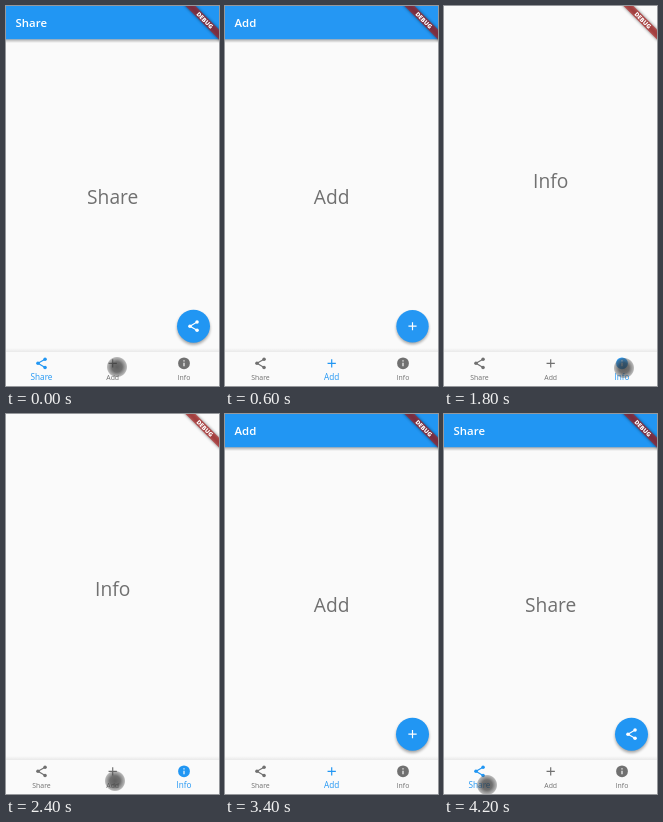
An HTML page that plays this animation: 213x380 px, repeating every 4.4 s.

```html
<!DOCTYPE html>
<html lang="en">
<head>
<meta charset="utf-8">
<title>Bottom navigation</title>
<style>
html, body { margin: 0; width: 100%; height: 100%; overflow: hidden; background: #fafafa; }
svg { display: block; width: 100%; height: 100%; }
text { font-family: "Open Sans", "Noto Sans", sans-serif; }
.mid { text-anchor: middle; }
</style>
</head>
<body>
<svg id="stage" viewBox="0 0 213 380">
  <defs>
    <linearGradient id="under" x2="0" y2="1">
      <stop offset="0" stop-opacity=".32"/><stop offset="1" stop-opacity="0"/>
    </linearGradient>
    <linearGradient id="over" x2="0" y2="1">
      <stop offset="0" stop-opacity="0"/><stop offset="1" stop-opacity=".07"/>
    </linearGradient>
    <radialGradient id="press">
      <stop offset="0" stop-color="#333" stop-opacity=".78"/>
      <stop offset=".5" stop-color="#3a3a3a" stop-opacity=".72"/>
      <stop offset=".72" stop-color="#484848" stop-opacity=".55"/>
      <stop offset=".9" stop-color="#555" stop-opacity=".42"/>
      <stop offset="1" stop-color="#666" stop-opacity="0"/>
    </radialGradient>
    <filter id="soft" x="-50%" y="-50%" width="200%" height="200%"><feGaussianBlur stdDeviation="1.7"/></filter>
    <g id="icon-share">
      <path d="M18 5 6 12 18 19" fill="none" stroke="currentColor" stroke-width="2"/>
      <circle cx="18" cy="5" r="3"/><circle cx="6" cy="12" r="3"/><circle cx="18" cy="19" r="3"/>
    </g>
    <path id="icon-add" d="M19 13h-6v6h-2v-6H5v-2h6V5h2v6h6z"/>
    <path id="icon-info" fill-rule="evenodd" d="M12 2a10 10 0 0 0 0 20a10 10 0 0 0 0-20zM13 17h-2v-6h2zM13 9h-2V7h2z"/>
  </defs>
  <rect width="213" height="380" fill="#fafafa"/>
  <text id="body" class="mid" x="106.7" font-size="19.2" fill="#707070"></text>
  <g id="bars"></g>
  <g id="fabs"></g>
  <rect y="342" width="213" height="4" fill="url(#over)"/>
  <rect y="346" width="213" height="34" fill="#fafafa"/>
  <g id="nav"></g>
  <circle id="touch" r="10.5" fill="url(#press)"/>
  <g transform="translate(213 0) rotate(45)">
    <rect x="-26" y="16.6" width="52" height="7.1" opacity=".5" filter="url(#soft)"/>
    <rect x="-26" y="16.6" width="52" height="7.1" fill="#b71c1c" fill-opacity=".63"/>
    <text class="mid" y="22.3" font-size="6" font-weight="800" fill="#fff">DEBUG</text>
  </g>
</svg>
<script>
const LOOP = 4400, STEP = 200, BLUE = [33, 150, 243], GREY = [112, 112, 112];
const SHARE = 0, ADD = 1, INFO = 2;
const pages = [
  { name: "Share", icon: "share", x: 35.5 },
  { name: "Add", icon: "add", x: 106.7 },
  { name: "Info", icon: "info", x: 178 }
];
// at: start; lead: progress on the first step
const switches = [
  { at: 200, from: SHARE, to: ADD, lead: .26 },
  { at: 1400, from: ADD, to: INFO, lead: .3 },
  { at: 2600, from: INFO, to: ADD, lead: .26 },
  { at: 3600, from: ADD, to: SHARE, lead: .12 }
];
// time, x, y; no x lifts the finger
const touches = [
  [0, 111, 361], [200, 112, 361], [400, 113, 361], [600],
  [800, 203, 361], [1000, 182, 362], [1200, 180, 362],
  [2200, 109, 367], [2600, 109, 366], [3000],
  [3200, 32, 376], [3400], [3600, 38, 373], [3800, 42, 371], [4000, 43, 371]
];

const $ = id => document.getElementById(id);
const clamp = v => Math.min(1, Math.max(0, v));
const last = (list, test) => list.filter(test).pop();

function add(parent, markup) {
  const g = document.createElementNS("http://www.w3.org/2000/svg", "g");
  g.innerHTML = markup;
  return parent.appendChild(g);
}

const icon = (name, x, y) =>
  `<use href="#icon-${name}" transform="translate(${x - 7.1} ${y - 7.1}) scale(.592)"/>`;

for (const p of pages) {
  p.tab = add($("nav"), icon(p.icon, p.x, 357.3) + `<text class="mid" x="${p.x}" y="373.7">${p.name}</text>`);
  p.label = p.tab.querySelector("text");
  if (p.icon === "info") continue;
  p.bar = add($("bars"),
    `<rect y="33" width="213" height="4" fill="url(#under)"/>
     <rect width="213" height="33.2" fill="rgb(${BLUE})"/>
     <text x="9.6" y="21" font-size="11.4" font-weight="600" fill="#fff">${p.name}</text>`);
  p.fab = add($("fabs"),
    `<circle cy="2" r="16.5" opacity=".35" filter="url(#soft)"/>
     <circle r="16.5" fill="rgb(${BLUE})"/>
     <g fill="#fff" color="#fff">${icon(p.icon, 0, 0)}</g>`);
}

function setTab(p, on) {
  const rgb = `rgb(${GREY.map((g, i) => Math.round(g + (BLUE[i] - g) * on))})`;
  p.tab.setAttribute("fill", rgb);
  p.tab.setAttribute("color", rgb);
  p.label.setAttribute("font-size", 6.9 + 1.3 * on);
}

function setTop(p, bar, fab) {
  p.bar.setAttribute("opacity", bar);
  p.fab.setAttribute("opacity", fab);
  p.fab.setAttribute("transform", `translate(187.5 320.2) scale(${fab})`);
}

function draw(ms) {
  const t = Math.floor(ms % LOOP / STEP) * STEP;
  const s = last(switches, w => w.at <= t) || { at: -LOOP, from: ADD, to: SHARE, lead: 1 };
  const k = clamp(s.lead + (t - s.at) / 555);
  const tabs = clamp(k * 2);
  const weight = i => i === s.to ? k : i === s.from ? 1 - k : 0;

  pages.forEach((p, i) => {
    setTab(p, i === s.to ? tabs : i === s.from ? 1 - tabs : 0);
    if (!p.bar) return;
    const w = weight(i);
    // The bar vanishes at once on the page without one; its button shrinks away.
    if (s.to === INFO) setTop(p, 0, i === s.from && t === s.at ? w : 0);
    else setTop(p, w, w);
  });
  const entering = pages[s.to].bar;
  if (entering) $("bars").appendChild(entering), $("fabs").appendChild(pages[s.to].fab);

  $("body").textContent = pages[s.to].name;
  $("body").setAttribute("y", s.to === INFO ? 181.5 : 197.8);

  const [, x, y] = last(touches, q => q[0] <= t);
  $("touch").setAttribute("visibility", x ? "visible" : "hidden");
  if (x) $("touch").setAttribute("transform", `translate(${x} ${y})`);
}

const start = performance.now();
function tick() {
  draw(performance.now() - start);
  requestAnimationFrame(tick);
}
tick();
</script>
</body>
</html>
```
